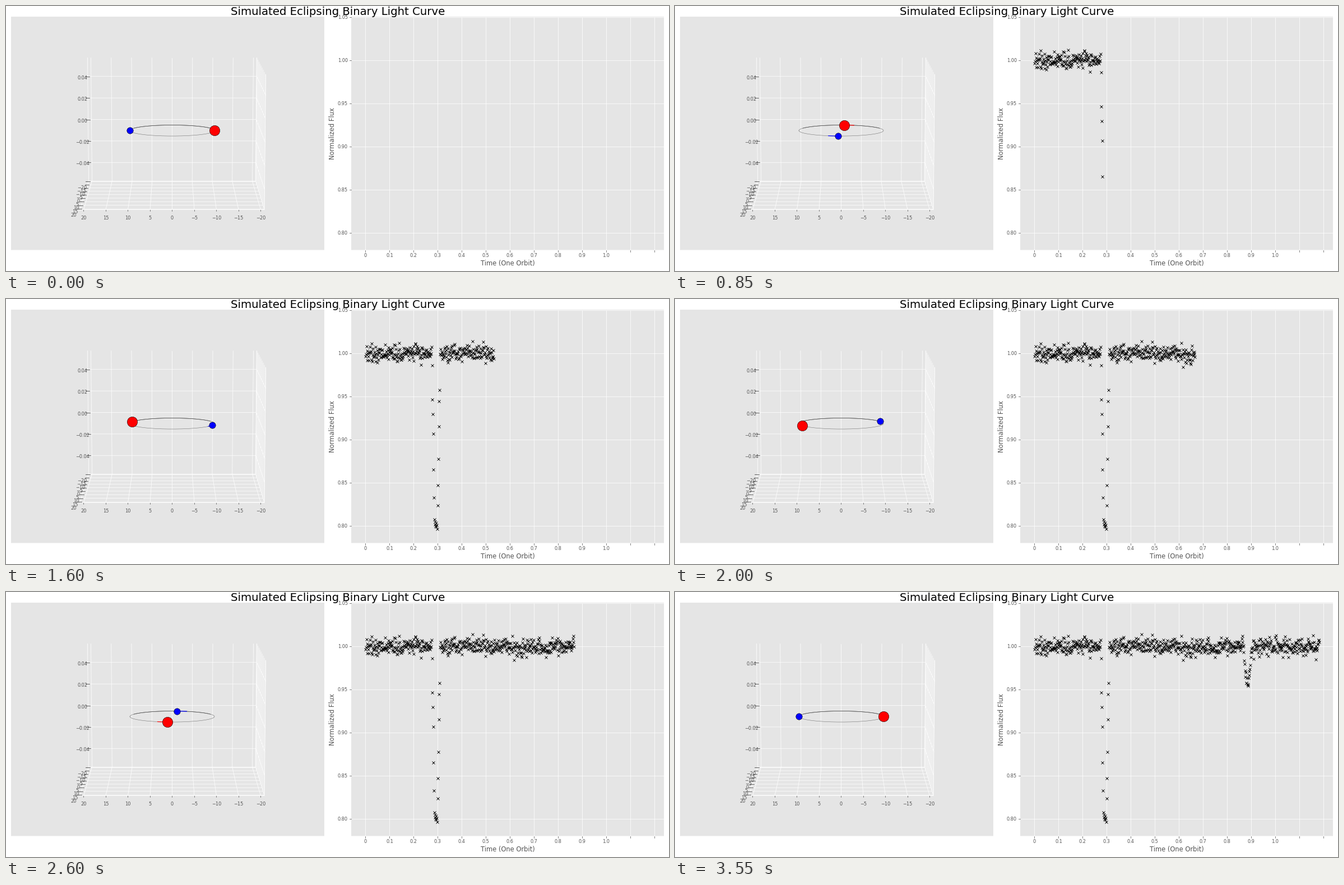
A matplotlib script that plays this animation: 1183x473 px, repeating every 3600 ms.

```python
import numpy as np
import matplotlib.pyplot as plt
from matplotlib.animation import FuncAnimation
from matplotlib.patches import Rectangle

W, H, DPI = 1183, 473, 64
FRAMES, INTERVAL = 72, 50
PERIOD = FRAMES - 1
SAMPLES = 10            # flux samples added per frame
TRAIL = 2.7             # trail length in frames
GREY, PANEL, DARK = "#555555", "#E5E5E5", "#333333"
SMALL, LABEL, TITLE = 8.215, 11.5, 19.72

plt.rcParams["font.family"] = "DejaVu Sans"
fig = plt.figure(figsize=(W / DPI, H / DPI), dpi=DPI, facecolor="white")
ax = fig.add_axes([0, 0, 1, 1])
ax.set_xlim(-0.5, W - 0.5)
ax.set_ylim(H - 0.5, -0.5)
ax.axis("off")


def pt(px):
    return px * 72 / DPI


def line(x, y, color="white", lw=0.75, z=2):
    return ax.plot(x, y, color=color, lw=pt(lw), zorder=z)[0]


def text(x, y, s, size=SMALL, color=GREY, ha="center", rotation=0):
    """Place text with its cap height centred on (x, y)."""
    drop = 0.365 * size
    if rotation:
        x += drop
    else:
        y += drop
    ax.text(x, y, s, fontsize=pt(size), color=color, ha=ha, va="baseline",
            rotation=rotation, rotation_mode="anchor", zorder=4)


def number(v, digits):
    return f"{v:.{digits}f}".replace("-", "\u2212")


def lerp(a, b, t):
    return a + (b - a) * t


# Orbit view: floor, back wall and right wall, limits a little past 20
LIMIT = 20 * 25 / 24
TICKS = np.arange(-20, 21, 5)
EDGED_TICKS = np.r_[-LIMIT, TICKS, LIMIT]


def depth(v):
    """Foreshortened position between the back (0) and front (1) edge."""
    s = (v + LIMIT) / (2 * LIMIT)
    return s / (1.106 - 0.106 * s)


def draw_box():
    for v in EDGED_TICKS:
        top, back, front = 296 - 7.25 * v, 296 - 7.15 * v, 296 - 7.9 * v
        line([top, back, front], [92, 312, 363])
        if v in TICKS:
            line([front, front], [362, 365], DARK, 0.6)
            text(front, 378, number(v, 0))

    for v in EDGED_TICKS:
        t = depth(v)
        left, y = lerp(147, 131.5, t), lerp(312, 363, t)
        line([left, lerp(445, 460.5, t), lerp(447, 463, t)],
             [y, y, lerp(92, 122, t)])
        if v in TICKS:
            line([left - 5, left + 2.5], [y, y], DARK)
            text(lerp(136, 120, t), y + 11, number(v, 0))

    for k in range(-2, 3):
        back, front = 202 - 38.4 * k, 242.5 - 42 * k
        left = 147 - 0.55 * k
        line([left, 446 + 0.4 * k, 461.8 + 0.5 * k], [back, back, front])
        line([left - 5, left + 2.5], [back, back], DARK)
        text(136, back + 2.2, number(0.02 * k, 2))


def time_x(i):
    return 641 + 0.7158 * i


def flux_y(f):
    return 96.2 + (1 - f) * 1542


def draw_chart():
    for k in range(13):
        x = time_x(60 * k)
        line([x, x], [19, 435])
        line([x, x], [435, 438], GREY)
        if k < 11:
            text(x, 444.5, f"{k / 10:.1f}" if k else "0")
    for k in range(6):
        f = 0.80 + 0.05 * k
        y = flux_y(f)
        line([616, 1174], [y, y])
        line([612.5, 615.5], [y, y], GREY)
        text(609.5, y, f"{f:.2f}", ha="right")
    text(895, 458.5, "Time (One Orbit)", LABEL)
    text(581, 227.5, "Normalized Flux", LABEL, rotation=90)


def eclipse(i, centre, drop):
    u = np.clip((11.3 - abs(i - centre)) / 9, 0, 1)
    return drop * u * u * (3 - 2 * u)


def light_curve():
    count = PERIOD * SAMPLES
    i = np.arange(count)
    noise = np.random.default_rng(4).normal(0, 0.005, count)
    first = 174.8
    flux = 1 + noise - eclipse(i, first, 0.203)
    flux -= eclipse(i, first + count / 2, 0.04)
    return time_x(i), flux_y(flux)


def orbit(n, side=1):
    a = 2 * np.pi * np.asarray(n) / PERIOD
    return 296 - side * 75.5 * np.cos(a), 221.8 + side * 9.8 * np.sin(a)


for left, width in ((9, 559), (616, 558)):
    ax.add_patch(Rectangle((left - 0.5, 18.5), width, 416.5, fc=PANEL, lw=0,
                           snap=False))
draw_box()
draw_chart()
text(592, 8.5, "Simulated Eclipsing Binary Light Curve", TITLE, "black")

# the far side of the path is a little darker
line(*orbit(np.linspace(0, PERIOD, 200)), color="#777777", lw=0.6, z=5)
line(*orbit(np.linspace(0.57, 0.93, 100) * PERIOD), color="#444444", lw=0.7, z=5)

stars = []
for side, color, size in ((1, "blue", 11.4), (-1, "red", 18.3)):
    trail = line([], [], color, 1.2, 6)
    star, = ax.plot([], [], "o", ms=pt(size), mfc=color, mec="black",
                    mew=pt(0.55), zorder=7)
    stars.append((side, trail, star))

times, flux = light_curve()
points, = ax.plot([], [], "x", color="black", ms=pt(5), mew=pt(0.85), zorder=5)


def update(n):
    for side, trail, star in stars:
        trail.set_data(*orbit(np.linspace(max(0, n - TRAIL), n, 12), side))
        star.set_data(*orbit([n], side))
    shown = n * SAMPLES
    points.set_data(times[:shown], flux[:shown])
    return [points]


anim = FuncAnimation(fig, update, frames=FRAMES, interval=INTERVAL, repeat=True)
plt.show()
```
